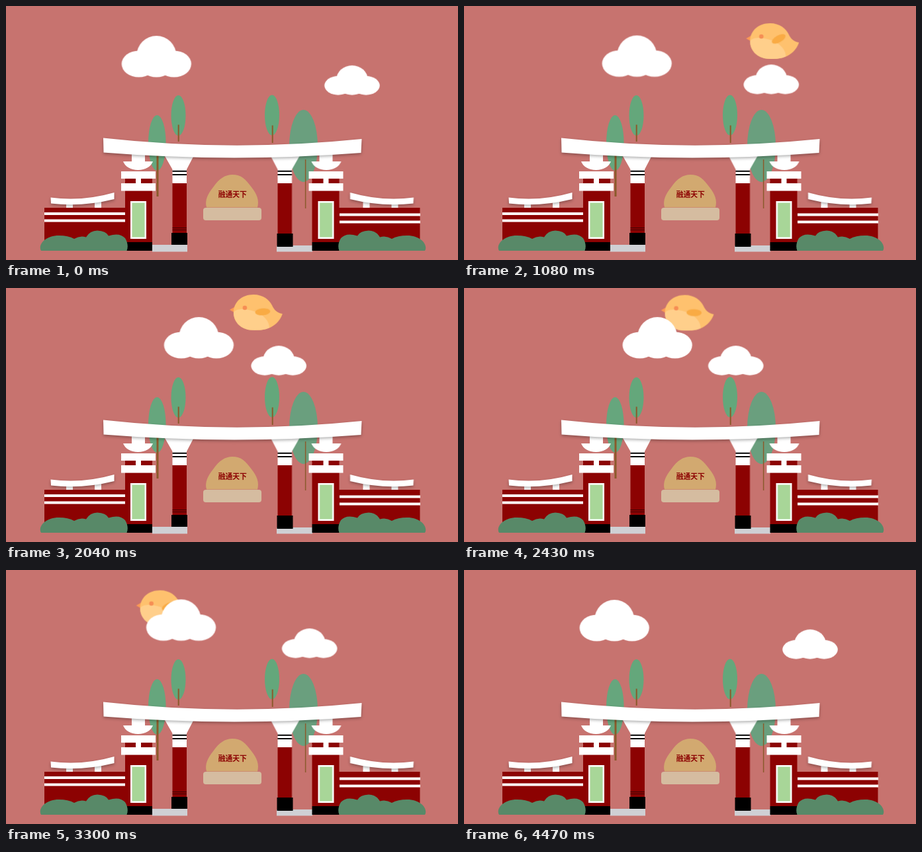
Animation, 683 px wide and 384 px high, one loop 4.5 s. Source, as an HTML page:

```html
<!DOCTYPE html>
<html lang="zh">
<head>
<meta charset="utf-8">
<title>Gate</title>
<style>
  html, body { margin: 0; width: 100%; height: 100%; overflow: hidden; background: #c7736f; }
  svg { display: block; width: 100%; height: 100%; }

  .big, .small, .bird { animation: 4.5s linear infinite; }
  .big { animation-name: big; }
  .small { animation-name: small; }
  .bird { animation-name: fly, fade; }
  .wing { animation: flap 375ms linear infinite alternate; }

  @keyframes big {
    0%, 99.333%, 100% { transform: translate(227.3px, 45.1px); }
    50% { transform: translate(298px, 43.8px); }
  }
  @keyframes small {
    0%, 99.333%, 100% { transform: translate(523px, 89.8px); }
    50% { transform: translate(400.8px, 87px); }
  }
  @keyframes fly {
    0% { transform: translate(525.8px, 44.3px); }
    50% { transform: translate(318.6px, 6.4px); }
    99.333%, 100% { transform: translate(61px, 57.7px); }
  }
  @keyframes fade {
    0%, 99.333%, 100% { opacity: 0; }
    6.667%, 92.667% { opacity: 1; }
  }
  @keyframes flap {
    from { transform: translate(44px, 26.5px) rotate(38deg); }
    to { transform: translate(44px, 26.5px) rotate(-38deg); }
  }

  .red { fill: #8c0202; }
  .white { fill: #fff; }
  .slab { fill: #cfd0d4; }
  .bush { fill: #588968; }
  .trunk { stroke: #8a5a2b; }
  .shadow { filter: drop-shadow(0 2px 2px rgba(0, 0, 0, .3)); }
  text { font: 900 10.8px "Noto Sans CJK SC", "Noto Sans CJK", sans-serif; fill: #8c0202; text-anchor: middle; }
</style>
</head>
<body>
<svg viewBox="0 0 683 384" preserveAspectRatio="none">
  <defs>
    <g id="cloud" fill="#fff">
      <circle cy="30" r="30"/>
      <ellipse cx="-26.6" cy="42.5" rx="26" ry="20"/>
      <ellipse cy="42.5" rx="26" ry="20"/>
      <ellipse cx="26.6" cy="42.5" rx="26" ry="20"/>
    </g>

    <g id="half">
      <!-- side wall -->
      <g class="white">
        <path d="M91 295h10v11h-10zM134 295h10v11h-10z"/>
        <path class="shadow" d="M67.5 289.5Q115 296 163.5 282V292Q115 304 68 298.5Z"/>
      </g>
      <path class="red" d="M58 305h122v65H58z"/>

      <!-- outer pillar -->
      <path class="red" d="M180 255h41v102h-41z"/>
      <path d="M180 357h41v13h-41z"/>
      <g class="white">
        <path d="M190 222h20v14h-20z"/>
        <path d="M177 235H222C219 243 210 248 199.5 248S180 243 177 235Z"/>
        <path d="M174 250h52v11h-22v7h22v11.500h-52v-11.500h22v-7h-22z"/>
        <path d="M188 295h24v57h-24z"/>
      </g>
      <path fill="#a8d698" d="M190.500 297.500h19v52h-19z"/>

      <!-- inner column -->
      <path class="red" d="M251.500 267h21.500v77h-21.500z"/>
      <path class="white" d="M239.500 226H284L273 247V268H251.500V247Z"/>
      <path d="M251.500 248.700h21.500v2h-21.500zM251.500 254h21.500v2h-21.500z"/>
    </g>

    <path id="bush" class="bush" d="M53 370C48 362 58 347 80 347Q94 347 103 352Q112 346.500 121 349.500Q127 339.500 138 339.500Q151 340 155 347.500Q172 342 180 351Q186 361 182.500 370Z"/>
  </defs>

  <rect width="683" height="384" fill="#c7736f"/>

  <g class="bird">
    <path fill="#fb9a55" d="M0 23L7 19V27Z"/>
    <path fill="#fec16e" d="M6 27C6 11 19 0 36 0C51 0 60 8 64 16C67 23 72 28 80 29C76 40 68 48 58 51C52 53.500 45 54 37 54C19 54 6 43 6 27Z"/>
    <path fill="#ffcf8b" d="M6 27C8 23 14 22 20 22C42 23 60 35 60 50.300C54 53.500 45 54 37 54C19 54 6 43 6 27Z"/>
    <circle cx="23" cy="20" r="3.300" fill="#f68e54"/>
    <g class="wing"><ellipse cx="6" rx="11.500" ry="5.200" fill="#f9ab44"/></g>
  </g>
  <g class="big"><use href="#cloud"/></g>
  <g class="small"><use href="#cloud" transform="scale(.794 .715)"/></g>

  <!-- trees -->
  <ellipse cx="260.500" cy="165.500" rx="11" ry="30.500" fill="#64a77b"/>
  <ellipse cx="402" cy="165" rx="11" ry="30.500" fill="#64a77b"/>
  <ellipse cx="228.300" cy="207" rx="13.300" ry="42" fill="#66a67d"/>
  <ellipse cx="449.500" cy="211.500" rx="21.500" ry="54.500" fill="#6a9f7e"/>
  <g class="trunk">
    <path stroke-width="2" d="M260.700 179.500V205M402.700 180.500V207"/>
    <path stroke-width="3" d="M229 226V288"/>
    <path stroke-width="1.500" d="M452.600 232V306"/>
  </g>

  <!-- stone -->
  <path fill="#d2a970" d="M303 304.500C300 294 305 284 313 274C322 261 331 255 342 255C356 255 362 262 371 274C379 284 383 294 380 304.500Z"/>
  <rect x="298" y="305" width="88" height="19" rx="4" fill="#d5bca0"/>
  <text x="342.300" y="289.300">融通天下</text>

  <!-- gate -->
  <path class="slab" d="M221 361h53v10.500h-53zM409 362h54v9.500h-54z"/>
  <use href="#half"/>
  <use href="#half" transform="translate(683.500) scale(-1 1)"/>
  <path class="white" d="M58 312h122v4H58zM58 322.500h122v4H58zM504 313.500h122v4H504zM504 324.500h122v4H504z"/>
  <path d="M250 343h24v18h-24zM409.500 344h24v20h-24z"/>
  <path stroke="#3a0505" d="M251.500 335.500h21.500M251.500 338.500h21.500"/>
  <path class="white shadow" d="M147 199.500Q342 221 537.500 201L536.500 222Q342 237 147.500 221.500Z"/>

  <use href="#bush"/>
  <use href="#bush" transform="translate(686) scale(-1 1)"/>
</svg>
</body>
</html>
```
